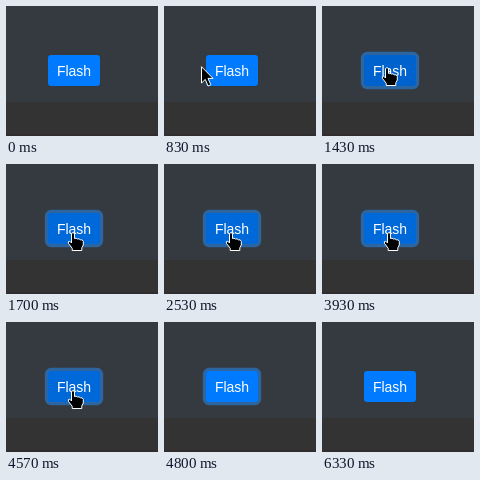
An HTML page for the animation above (7.87 s loop, 152 px wide and 130 px high).

```html
<!DOCTYPE html>
<html lang="en">
<meta charset="utf-8">
<title>Flash button</title>
<style>
  html, body { margin: 0; width: 100%; height: 100%; overflow: hidden; background: #343a40; }
  #footer { position: absolute; top: 96px; left: 0; right: 0; height: 32px; background: #333; border-bottom: 2px solid #302c30; }
  #button {
    position: absolute; left: 42px; top: 49px; width: 52px; height: 31px;
    border-radius: 3.2px; color: #fff; text-align: center;
    font: 14px/33px "Liberation Sans", Arial, sans-serif;
  }
  svg { position: absolute; left: 0; top: 0; width: 152px; height: 130px; }
  path { fill: #000; stroke: #fff; stroke-width: 1; stroke-linejoin: round; }
</style>
<div id="footer"></div>
<div id="button">Flash</div>
<svg viewBox="0 0 152 130">
  <g id="cursor">
    <path id="arrow" d="M.5 .7V17L4.3 13.4L7 20L9.8 18.8L7 12.4H12Z"/>
    <path id="hand" d="M-1.5 .5Q0-1.2 1.5 .5V5.5Q3.2 4.6 4.4 6Q6.2 5.2 7.3 6.8Q9.6 6.2 10.3 8.3V12L8.8 14.8V17.5H-.8V15.3L-4.6 10.3Q-5.3 7.8-3.2 8.2L-1.5 10Z"/>
  </g>
</svg>
<script>
const LOOP = 7870;
const NORMAL = [0, 123, 255], HOVER = [0, 105, 217], ACTIVE = [0, 98, 204];
const [button, cursor, arrow, hand] =
  ["button", "cursor", "arrow", "hand"].map(id => document.getElementById(id));

const mix = (a, b, k) => a.map((v, i) => v + (b[i] - v) * k);
const ramp = (t, from, to) => Math.min(1, Math.max(0, (t - from) / (to - from)));

// Interpolates [time, ...values] keys.
function along(keys, t) {
  const next = keys.findIndex(key => key[0] > t);
  if (next < 0) return keys.at(-1).slice(1);
  if (next === 0) return keys[0].slice(1);
  const a = keys[next - 1], b = keys[next];
  return mix(a.slice(1), b.slice(1), ramp(t, a[0], b[0]));
}

const path = [
  [630, 18, 59], [830, 37, 60], [1030, 65, 62], [1500, 65, 62], [1700, 67, 69],
  [4570, 67, 69], [4690, 104, 59], [4800, 153, 48]
];
const clicks = [[1370, 1700], [2330, 2530], [3200, 3330], [3930, 4100]];

function press(t) {
  const click = clicks.find(([down, up]) => t >= down && t < up);
  if (!click) return 0;
  const [down, up] = click, peak = down + (up - down) * 0.35;
  return Math.min(ramp(t, down, Math.min(peak, down + 60)), 1 - ramp(t, peak, up));
}

function draw(now) {
  const t = now % LOOP;
  const [x, y] = along(path, t);
  const over = x >= 42 && x < 94 && y < 80;

  const hover = ramp(t, 870, 1020) - ramp(t, 4650, 4800);
  const fill = mix(mix(NORMAL, HOVER, hover), ACTIVE, press(t));
  const ring = ramp(t, 1370, 1430) - ramp(t, 6270, 6330);
  button.style.background = `rgb(${fill.map(Math.round)})`;
  button.style.boxShadow = `0 0 0 3.2px rgba(38, 143, 255, ${0.5 * ring})`;

  cursor.style.display = t >= 630 && t < 4800 ? "" : "none";
  cursor.setAttribute("transform", `translate(${Math.round(x)} ${Math.round(y)})`);
  arrow.style.display = over ? "none" : "";
  hand.style.display = over ? "" : "none";
}

const start = performance.now();
function tick() {
  draw(performance.now() - start);
  requestAnimationFrame(tick);
}
tick();
</script>
</html>
```
